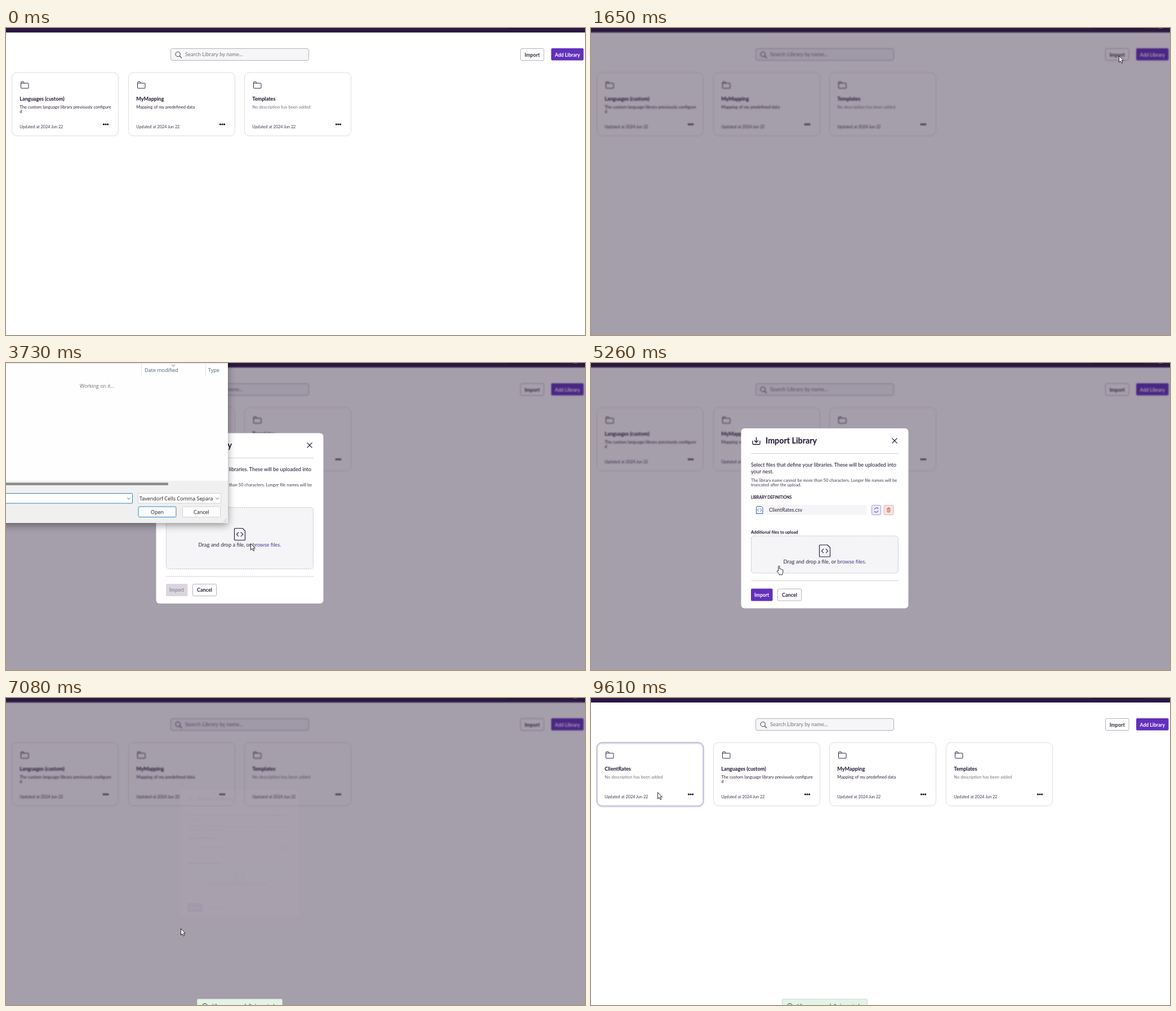
An HTML page that plays this animation: 1028 by 545 pixels, repeating every 9.7 s.

```html
<!DOCTYPE html>
<html lang="en">
<head>
<meta charset="utf-8">
<title>Import a library</title>
<style>
  html, body { margin: 0; width: 100%; height: 100%; overflow: hidden; background: #fff; }
  svg { display: block; width: 1028px; height: 545px; font-family: Lato, "Open Sans", sans-serif; }
  .sys { font-family: "Open Sans", "Noto Sans", sans-serif; }
</style>
</head>
<body>
<svg id="stage" viewBox="0 0 1028 545" xmlns="http://www.w3.org/2000/svg"></svg>
<script>
const LOOP = 9700;
const INK = '#1c1030', PURPLE = '#6230bd', GREY = '#77747d';

// Drawing helpers
const text = (x, y, size, str, fill = INK, weight = 400, extra = '') =>
  `<text x="${x}" y="${y}" font-size="${size}" fill="${fill}" font-weight="${weight}" ${extra}>${str}</text>`;
const box = (x, y, w, h, r, fill, stroke = 'none', extra = '') =>
  `<rect x="${x}" y="${y}" width="${w}" height="${h}" rx="${r}" fill="${fill}" stroke="${stroke}" ${extra}/>`;
const line = (d, stroke = INK, width = 1, extra = '') =>
  `<path d="${d}" fill="none" stroke="${stroke}" stroke-width="${width}" ${extra}/>`;
const group = (id, body, extra = '') => `<g id="${id}" ${extra}>${body}</g>`;
const at = (x, y, body) => `<g transform="translate(${x} ${y})">${body}</g>`;
const mid = 'text-anchor="middle"';

// Library cards
const blank = ['No description has been added'];
const libs = [
  ['ClientRates', blank],
  ['Languages (custom)', ['The custom language library previously configure', 'd']],
  ['MyMapping', ['Mapping of my predefined data']],
  ['Templates', blank]
];
const folder = line('M.5 1.5q0-1 1-1H5L6.5 3H13q1 0 1 1v7q0 1-1 1H1.5q-1 0-1-1zM.5 3H6.5', '#2c2340', 1);

function card([name, desc], i) {
  const tone = desc === blank ? GREY : '#2a2038';
  return at(Math.round(206.6 * i), 0,
    box(10.5, 79, 189, 112.5, 9, '#fff', '#dddbe1') + at(26, 95, folder) +
    text(24.3, 128.6, 9.15, name, INK, 700) +
    desc.map((s, n) => text(24.3, 143 + 8.3 * n, 7.6, s, tone)).join('') +
    text(24.3, 177.6, 7.25, 'Updated at 2024 Jun 22', '#3c344a') +
    [173.4, 177, 180.6].map(x => `<circle cx="${x}" cy="171" r="1.6" fill="#140a22"/>`).join(''));
}

const page =
  box(-20, -20, 1068, 585, 0, '#fff') + box(-20, -20, 1068, 28, 0, '#2b1844') +
  box(888, -8, 97, 8.8, 4, '#0b0512') +
  box(292.5, 36.5, 245, 21, 3.5, '#f6f5f7', '#b5b2ba') +
  '<circle cx="305.2" cy="46.6" r="4.2" fill="none" stroke="#37304a"/>' + line('M308.3 49.7L312 53.4', '#37304a', 1.2) +
  text(318, 50, 9.45, 'Search Library by name...', '#77747d') +
  box(913.5, 36.5, 41.5, 21, 2, '#fff', '#b5b2ba') + text(934.3, 50.6, 9, 'Import', '#33293f', 700, mid) +
  box(968, 36, 57.5, 21.5, 2, PURPLE) + text(996.8, 50.5, 8.6, 'Add Library', '#fff', 700, mid) +
  group('before', libs.slice(1).map(card).join('')) +
  group('after', libs.map(card).join('') +
    group('hover', box(10.5, 79, 189, 112.5, 9, 'none', '#b5addb', 'style="filter:drop-shadow(0 1.5px 1px #8d86a8)"')));

// Import window
const codeIcon = line('M1.5.5H15L19.5 5V20.5q0 1-1 1H1.5q-1 0-1-1V1.5q0-1 1-1zM8 7.5L4.5 11.2 8 15M12 7.5L15.500 11.2 12 15', '#1f1630', 1.1);
const rule = y => box(284, y, 262, 1, 0, '#d3d1d6');

const header =
  line('M287 146v5q0 1.500 1.500 1.500h10q1.500 0 1.500-1.500v-5M293.500 139.500v9M290 145.500l3.500 3.500 3.500-3.500', INK, 1.3) +
  text(310, 151.3, 14.3, 'Import Library', INK, 700) +
  line('M534.500 141.500l9 9M543.500 141.500l-9 9', '#2b2140', 1.1) + rule(168) +
  text(284, 191.5, 9.2, 'Select files that define your libraries. These will be uploaded into') +
  text(284, 204.3, 9.2, 'your nest.') +
  text(284, 219, 7.6, 'The library name cannot be more than 50 characters. Longer file names will be', '#443b52') +
  text(284, 227.4, 7.6, 'truncated after the upload.', '#443b52') +
  text(284, 249, 6.85, 'LIBRARY DEFINITIONS', INK, 700);

const drop = (y, h, icon) =>
  box(284.5, y + .5, 261, h - 1, 5, '#f5f4f7', '#bab7c0', 'stroke-dasharray="2 1.500"') +
  at(405, icon, codeIcon) +
  text(415, icon + 33, 9.35, 'Drag and drop a file, or <tspan fill="#4b3a8e">browse files.</tspan>', '#33293f', 400, mid);

const buttons = (y, label, fill, ink, w = 38.5) =>
  box(284, y, w, 22, 2, fill) + label(y + 14.3, ink) +
  box(284 + w + 9, y + .5, 42, 21, 2, '#fff', '#b5b2ba') +
  text(284 + w + 30, y + 14.3, 9.1, 'Cancel', '#2a2038', 700, mid);
const importLabel = (y, ink) => text(303.2, y, 8.7, 'Import', ink, 700, mid);
const busyLabel = (y, ink) => text(308, y, 8.7, 'Importing', ink, 700) +
  group('spin', '<circle r="4.5" fill="none" stroke="#fff" stroke-width="1.3" stroke-dasharray="20 8.3"/>');

const emptyForm =
  box(266.5, 124.5, 297, 302.5, 6, '#fff') + header + drop(256, 110, 293) + rule(378.5) +
  buttons(392, importLabel, '#dad6df', '#94899f');

const filledForm =
  box(266.5, 116, 297, 319.5, 6, '#fff') + at(0, -8, header) +
  line('M294.500 254.500h8l2.500 2.500v10.500h-11.500v-12zM298 258.500l-2.500 2.500 2.500 2.500M300.500 258.500l2.500 2.500-2.500 2.500', '#2c55a8') +
  box(310, 252, 179, 17.5, 2, '#f5f4f7') + text(316, 263.8, 8.9, 'ClientRates.csv', '#2a2038') +
  box(498.5, 252.5, 16, 17, 2, '#ece7fa', '#a79bd6') +
  line('M503.500 260a3.300 3.300 0 0 1 6-1.500v-1.500M509.700 262a3.300 3.300 0 0 1-6 1.500v1.500', '#4f3aa3') +
  box(520, 252.5, 17, 17, 2, '#f9e3dd', '#dfb3a8') +
  line('M525.500 258.500h6M527.500 258v-1h2v1M526.300 259v5.500h4.400V259M528.500 260v3.500', '#b4503f', .9) +
  text(284, 303, 7.5, 'Additional files to upload', INK, 700) + drop(306.5, 67, 322.5) + rule(386) +
  group('idle', buttons(400.5, importLabel, PURPLE, '#fff')) +
  group('busy', buttons(400.5, busyLabel, PURPLE, '#fff', 71));

// System file picker
const chevron = (x, y) => line(`M${x - 2.8} ${y - 1.4}l2.800 2.800 2.800-2.800`, '#555', .9);
const pickerButton = (x, label, stroke) =>
  box(x + .5, 255, 67, 18.5, 2, '#fdfdfd', stroke) + text(x + 34, 268, 9, label, '#1b1b1b', 400, mid);
const picker =
  box(-20, -20, 414, 304, 0, '#f0f0f0', 'none', 'style="filter:drop-shadow(0 4px 7px rgba(0,0,0,.4))"') +
  box(-20, 2, 414, 207, 0, '#fefefe') + box(240, 2, 1, 20, 0, '#e2e2e2') + box(354, 2, 1, 20, 0, '#e2e2e2') +
  chevron(297, 4.5) + text(246, 15.7, 9, 'Date modified', '#4c607a') + text(359, 15.7, 9, 'Type', '#4c607a') +
  text(131, 44.3, 8.8, 'Working on it...', '#6d6d6d') + box(-20, 212.5, 308, 4.5, 0, '#8b8b8b') +
  box(-20.5, 231.5, 245, 17.5, 1, '#fff', '#2f83c5') + chevron(218, 240.5) +
  box(234.500, 231.500, 147, 17.500, 1, '#fff', '#d2d2d2') +
  text(237, 244, 9, 'Tavendorf Cells Comma Separa', '#1b1b1b') + chevron(375, 240.5) +
  pickerButton(234.5, 'Open', '#2f83c5') + pickerButton(313, 'Cancel', '#d2d2d2') +
  line('M386 281.500h6M388 279h4M390 276.500h2', '#a5a5a5', 1.2, 'stroke-dasharray="1.200 1"');

const toast =
  box(339.5, 534.5, 151, 30, 2, '#e4f2e8', '#c9ddd0') +
  '<circle cx="353" cy="547.500" r="5" fill="none" stroke="#24352b"/>' +
  text(366, 550.3, 8.7, 'Library successfully imported', '#24352b');

const arrow = '<path d="M.5.5V12L3.200 9.500 5 13.500 6.900 12.700 5.100 8.700H8.300z" fill="#fff" stroke="#111" stroke-width=".9"/>';
const hand = '<path d="M-1.200 8V1.200q0-1 1.100-1t1.100 1V5.500q2-.6 2.300.4 1.700-.3 2 .7 1.700-.1 1.700 1.400v3q0 2-1.300 3.300v1.500H.200V14.500L-3.300 10q-.6-1.300.5-1.700 1 0 1.600 1z" fill="#fff" stroke="#111" stroke-width=".9"/>';

document.getElementById('stage').innerHTML =
  group('page', page) +
  group('dim', box(0, 0, 1028, 545, 0, 'rgb(43,28,58)', 'none', 'opacity=".425"') +
    '<ellipse cx="1011" cy="-1" rx="5" ry="1.800" fill="#cfc8d6" opacity=".6"/>') +
  group('modal', group('empty', emptyForm) + group('filled', filledForm)) +
  group('picker', picker, 'class="sys"') + group('toast', toast) +
  group('cursor', group('ring', '<circle r="10" fill="#ff0" opacity=".47"/>') + group('arrow', arrow) + group('hand', hand));

// Motion: [ms, x, y]
const path = [
  [390, 984, 443], [850, 953, 79], [1110, 953, 79], [1250, 937, 49], [1990, 937, 49],
  [2060, 711, 131], [2130, 570, 225], [2200, 434, 320], [3800, 434, 320], [3870, 274, 268],
  [4770, 274, 268], [5260, 334, 360], [5710, 310, 409], [8139, 310, 409], [8140, 285, 375],
  [8500, 185, 250], [8880, 118, 167], [LOOP, 118, 167]
];
const handTimes = [[1230, 1450], [2190, 3400], [4980, 5380], [5690, 6820], [8790, 9610]];
const clicks = [[1300, 1440], [3060, 3260], [5770, 5970], [9340, 9610]];

const $ = id => document.getElementById(id);
const ramp = (t, a, b) => Math.min(1, Math.max(0, (t - a) / (b - a)));
const within = (t, spans) => spans.some(([a, b]) => t >= a && t < b);
const show = (id, on) => $(id).setAttribute('visibility', on ? 'inherit' : 'hidden');
const move = (id, v) => $(id).setAttribute('transform', v);

function cursorAt(t) {
  const i = Math.max(1, path.findIndex(k => k[0] > t));
  const [a, b] = [path[i - 1], path[i]];
  const p = ramp(t, a[0], b[0]);
  return [a[1] + (b[1] - a[1]) * p, a[2] + (b[2] - a[2]) * p];
}

function draw(t) {
  const [x, y] = cursorAt(t);
  const pointing = within(t, handTimes);
  show('cursor', t >= 390);
  move('cursor', `translate(${x.toFixed(1)} ${y.toFixed(1)})`);
  show('hand', pointing);
  show('arrow', !pointing);
  show('ring', within(t, clicks));

  const dim = ramp(t, 1400, 1640) - ramp(t, 7090, 7260);
  $('dim').setAttribute('opacity', dim);
  $('page').style.filter = dim > 0 ? `blur(${(.8 * dim).toFixed(2)}px)` : 'none';

  const enter = 1 - (1 - ramp(t, 1670, 2060)) ** 2;
  const open = enter - ramp(t, 6800, 7090);
  const scale = .7 + .3 * open;
  show('modal', open > 0);
  $('modal').setAttribute('opacity', open);
  move('modal', `translate(414.5 275.5) scale(${scale}) translate(-414.5 -275.5)`);

  const filled = t >= 4000, busy = t >= 5980 && t < 6740;
  show('empty', !filled);
  show('filled', filled);
  show('idle', filled && !busy);
  show('busy', filled && busy);
  move('spin', `translate(297 411.500) rotate(${t * .36 % 360})`);
  show('picker', t >= 3730 && t < 3930);

  show('toast', t >= 6820);
  move('toast', `translate(0 ${12 * (1 - ramp(t, 6820, 7000))})`);
  show('before', t < 7190);
  show('after', t >= 7190);
  show('hover', t > 8140 && y < 191);
}

const start = performance.now();
(function tick() {
  draw((performance.now() - start) % LOOP);
  requestAnimationFrame(tick);
})();
</script>
</body>
</html>
```
